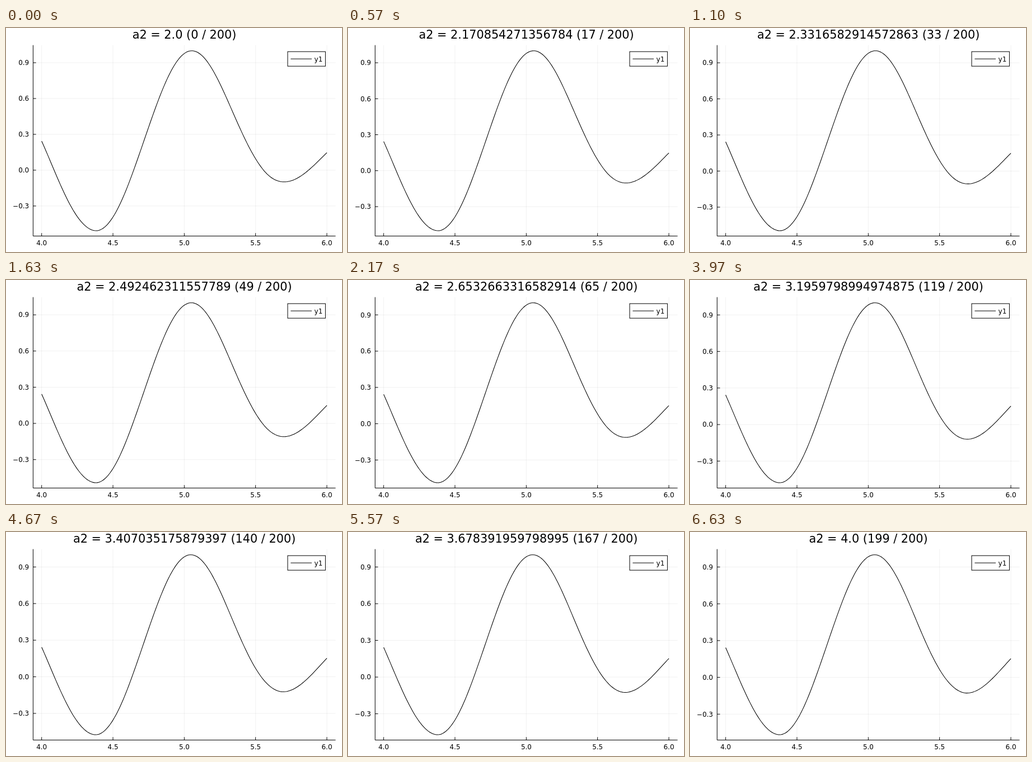
An HTML page for the animation above (6660 ms loop, 600x400 px).

```html
<!DOCTYPE html>
<html lang="en">
<head>
<meta charset="utf-8">
<title>Parameter sweep</title>
<style>
  html, body { margin: 0; width: 100%; height: 100%; overflow: hidden; background: #fff; }
  svg { display: block; width: 600px; height: 400px; }
  text { font: 11.9px "DejaVu Sans", sans-serif; fill: #000; }
  #title { font-size: 20.8px; text-anchor: middle; }
  .x { text-anchor: middle; }
  .y { text-anchor: end; }
  path, rect { fill: none; stroke: #000; stroke-width: 1; }
  .grid { stroke-opacity: .1; stroke-width: .6; }
  #curve { stroke-width: 1.05; stroke-linejoin: round; }
</style>
</head>
<body>
<svg viewBox="0 0 600 400">
  <g id="axes"></g>
  <path d="M48.4 30.6V371.5H588.5"/>
  <path id="curve"/>
  <rect x="503" y="42.2" width="67.4" height="26" style="fill:#fff"/>
  <path d="M508.4 55.2H546"/>
  <text x="550.6" y="59.5">y1</text>
  <text id="title" x="318.6" y="18.8"></text>
</svg>
<script>
const LOOP = 6660, STEPS = 200;
const LEFT = 48.4, RIGHT = 588.5, TOP = 30.6, BOTTOM = 371.5;
const PEAK = 40.65, SPAN = 321.4;

// The curve is sin(phase); knots are [x, phase, slope] at a2 = 2 and a2 = 4.
const START = [
  [4, .246, -2.75], [4.382, -.532, 0], [4.645, 0, 3.3], [5.053, Math.PI / 2, 4.05],
  [5.556, Math.PI, 1.45], [5.701, 3.24, 0], [6, 2.994, -1.2]
];
const END = [
  [4, .245, -2.72], [4.378, -.487, 0], [4.631, 0, 3.21], [5.0445, Math.PI / 2, 4.03],
  [5.536, Math.PI, 1.6], [5.692, 3.27, 0], [6, 2.988, -1.27]
];

const $ = id => document.getElementById(id);
const px = x => 63.7 + (x - 4) * 254.65;

function add(tag, attrs, text = "") {
  const el = document.createElementNS("http://www.w3.org/2000/svg", tag);
  for (const key in attrs) el.setAttribute(key, attrs[key]);
  el.textContent = text;
  return $("axes").appendChild(el);
}

for (const x of [4, 4.5, 5, 5.5, 6]) {
  add("path", { class: "grid", d: `M${px(x)} ${TOP}V${BOTTOM}` });
  add("path", { d: `M${px(x)} ${BOTTOM}v-5.2` });
  add("text", { class: "x", x: px(x), y: 387.5 }, x.toFixed(1));
}

const rows = [.9, .6, .3, 0, -.3].map(value => ({
  value,
  grid: add("path", { class: "grid" }),
  tick: add("path", {}),
  label: add("text", { class: "y", x: 41.1 }, value.toFixed(1).replace("-", "\u2212"))
}));

function phaseAt(x, knots) {
  let i = 0;
  while (i < knots.length - 2 && x > knots[i + 1][0]) i++;
  const [x0, p0, m0] = knots[i], [x1, p1, m1] = knots[i + 1];
  const h = x1 - x0, t = (x - x0) / h, s = 1 - t;
  return s * s * ((1 + 2 * t) * p0 + t * h * m0) + t * t * ((1 + 2 * s) * p1 - s * h * m1);
}

function draw(step) {
  const a2 = (398 + 2 * step) / 199;
  const mix = 4 / a2 - 1;
  const knots = END.map((k, i) => k.map((v, j) => v + (START[i][j] - v) * mix));
  const unit = SPAN / (1 - Math.sin(knots[1][1]));
  const py = y => PEAK + (1 - y) * unit;

  let d = "";
  for (let i = 0; i <= 200; i++) {
    const x = 4 + i / 100;
    d += `${i ? "L" : "M"}${px(x).toFixed(2)} ${py(Math.sin(phaseAt(x, knots))).toFixed(2)}`;
  }
  $("curve").setAttribute("d", d);

  for (const { value, grid, tick, label } of rows) {
    const y = py(value);
    grid.setAttribute("d", `M${LEFT} ${y}H${RIGHT}`);
    tick.setAttribute("d", `M${LEFT} ${y}h5.2`);
    label.setAttribute("y", y + 4.3);
  }
  const name = Number.isInteger(a2) ? a2.toFixed(1) : String(a2);
  $("title").textContent = `a2 = ${name} (${step} / ${STEPS})`;
}

let shown = -1;
function tick(now) {
  // Thirty steps a second, snapped to hundredths of a second.
  const step = Math.floor((Math.floor((now % LOOP) / 10) + .5) * .3);
  if (step !== shown) draw(shown = step);
  requestAnimationFrame(tick);
}
draw(0);
requestAnimationFrame(tick);
</script>
</body>
</html>
```
